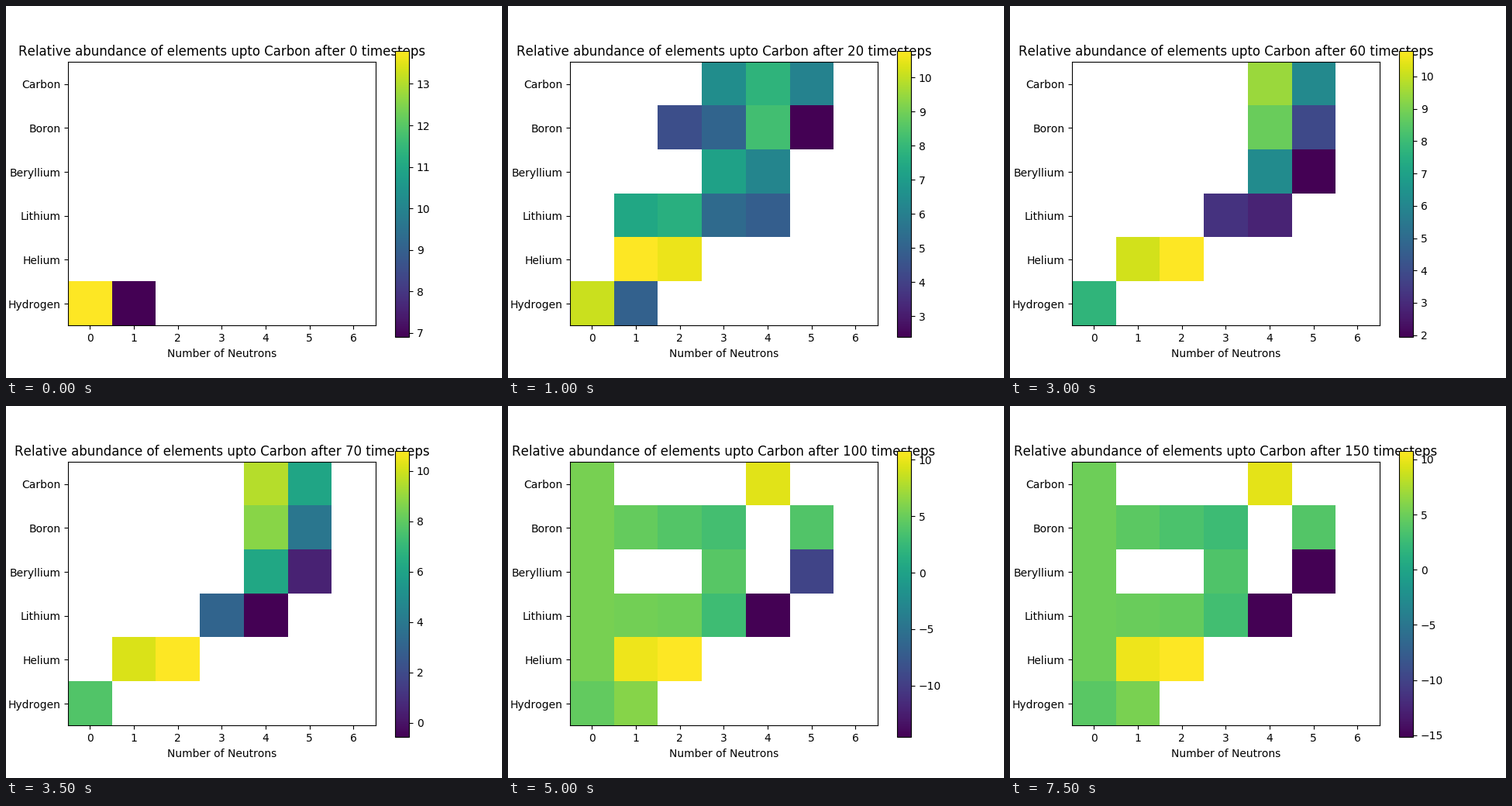
A matplotlib script that plays this animation: 640 px wide and 480 px high, repeating every 8000 ms.

```python
import numpy as np
import matplotlib.pyplot as plt
from matplotlib.animation import FuncAnimation

plt.rcParams["font.family"] = "DejaVu Sans"
plt.rcParams["text.kerning_factor"] = 6

ELEMENTS = ["Hydrogen", "Helium", "Lithium", "Beryllium", "Boron", "Carbon"]
H, HE, LI, BE, B, C = range(6)
NEUTRONS = 7
START, SWITCH, END = 10, 80, 150  # first fusion, late regime, last step

t = np.arange(0, END + 1, 10)

# Log abundance per timestep, NaN where a nuclide is absent.
abundance = np.full((len(t), len(ELEMENTS), NEUTRONS), np.nan)


def put(element, neutrons, level, first=START, last=END):
    """Give a nuclide its level (constant or per step) while it exists."""
    alive = (t >= first) & (t <= last)
    abundance[alive, element, neutrons] = np.broadcast_to(level, t.shape)[alive]


def burn_early():
    """Hydrogen burns away and short-lived nuclides pass by."""
    put(H, 0, 7.7 + 6.1 * np.exp(-(t / 21) ** 1.5), first=0, last=SWITCH - 1)
    put(H, 1, 6.9 - 0.095 * t, first=0, last=20)
    put(LI, 1, 7.4, last=20)
    put(LI, 2, 7.7, last=30)
    put(BE, 3, 7.2, last=30)
    put(BE, 4, 6.2, last=70)
    put(B, 2, 4.4, last=20)
    put(B, 3, 5.1, last=30)
    put(B, 4, 8.8 - 4 * np.exp(-t / 10), last=70)
    put(C, 3, 6.5, last=50)
    put(C, 5, 6.1, last=SWITCH)


def settle():
    """Nuclides that last: stable ones saturate, two collapse to a floor."""
    put(HE, 1, 10.15 + 0.64 * np.exp(-((t - 20) / 25) ** 2))
    put(HE, 2, 10.8 - 0.25 * np.exp((20 - t) / 8))
    put(B, 5, 3.9 - 16.4 * np.exp((START - t) / 4.2))
    put(C, 4, 9.7 - 5 * np.exp(-t / 20))

    decay = 2.9 + 6.5 * np.exp(-t / 20)
    floor = -13.3 - t / 80
    put(LI, 3, decay)
    put(LI, 4, np.clip(-7.56 - 0.7 * (t - SWITCH), floor, decay - 0.4))
    put(BE, 5, np.maximum(2.41 - 0.0047 * (t - 50).clip(0) ** 2, floor), first=30)


def spread_late():
    """Neutron-poor nuclides appear and slowly thin out."""
    level = 5.8 - (t - SWITCH) / 90
    put(H, 0, level - 0.9, first=SWITCH)
    put(H, 1, level + 0.6, first=SWITCH)
    poor = [(z, 0) for z in range(HE, C + 1)] + [(LI, 1), (B, 1), (B, 2)]
    for z, n in poor:
        put(z, n, level - 0.05 * z**2 * n, first=SWITCH)
    for z, n in [(LI, 2), (BE, 3), (B, 3)]:
        put(z, n, level - 0.05 * z**2 * n, first=SWITCH + 10)


burn_early()
settle()
spread_late()

fig, ax = plt.subplots(figsize=(6.4, 4.8), dpi=100)
image = ax.imshow(abundance[0], cmap="viridis")
ax.invert_yaxis()
fig.colorbar(image, ax=ax)
ax.set_xticks(range(NEUTRONS))
ax.set_yticks(range(len(ELEMENTS)), ELEMENTS)
ax.set_xlabel("Number of Neutrons")
title = ax.set_title("")


def update(i):
    grid = abundance[i]
    image.set_data(np.ma.masked_invalid(grid))
    image.set_clim(np.nanmin(grid), np.nanmax(grid))
    title.set_text("Relative abundance of elements upto Carbon "
                   f"after {t[i]} timesteps")
    return image, title


anim = FuncAnimation(fig, update, frames=len(t), interval=500,
                     repeat=True, repeat_delay=0, blit=False)
plt.show()
```
